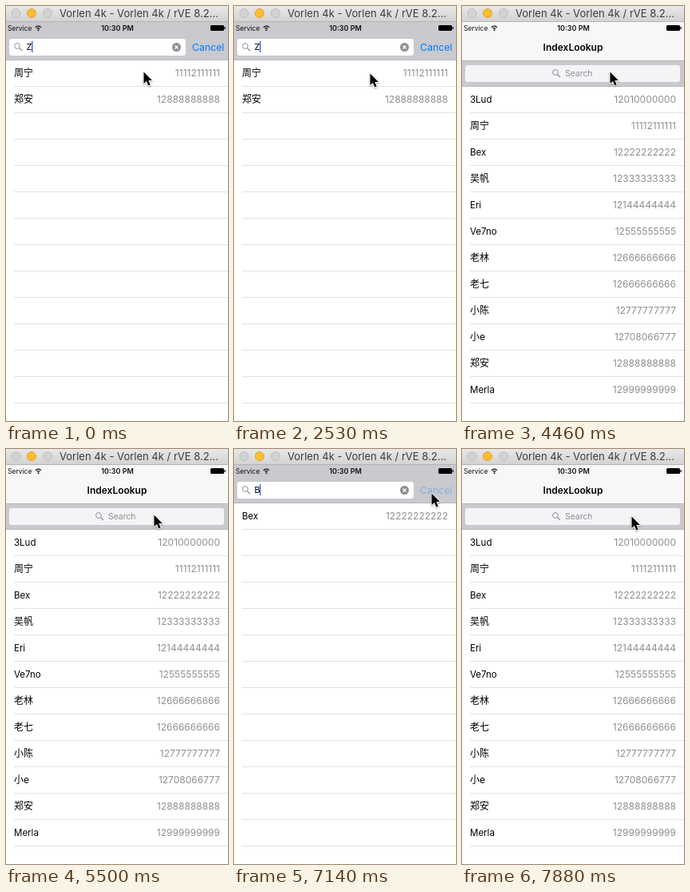
Animation, 278 px wide and 519 px high, one loop 8000 ms. Source, as an HTML page with a canvas:

```html
<!DOCTYPE html>
<html lang="zh">
<head>
<meta charset="utf-8">
<title>Contact search</title>
<style>
html, body { margin: 0; width: 100%; height: 100%; overflow: hidden; background: #fff; }
canvas { display: block; width: 278px; height: 519px; }
</style>
</head>
<body>
<canvas id="stage"></canvas>
<script>
const W = 278, H = 519, LOOP = 8000, TICK = 148.67;
const GRAY = '#8e8e93';
const FONT = 'Inter, "Noto Sans CJK SC", "Noto Sans CJK", sans-serif';

const contacts = [
  ['3Lud', '12010000000'], ['周宁', '11112111111'], ['Bex', '12222222222'],
  ['吴帆', '12333333333'], ['Eri', '12144444444'], ['Ve7no', '12555555555'],
  ['老林', '12666666666'], ['老七', '12666666666'], ['小陈', '12777777777'],
  ['小e', '12708066777'], ['郑安', '12888888888'], ['Merla', '12999999999']
];
const matches = { Z: [contacts[1], contacts[10]], B: [contacts[2]] };

// Pointer tip: time, x, y
const path = [
  [0, 172, 82], [300, 182, 84], [600, 204, 84], [1040, 187, 84], [1340, 174, 84],
  [1630, 170, 84], [2560, 170, 84], [3300, 251, 46], [3717, 251, 46], [4460, 185, 82],
  [6400, 185, 82], [7080, 247, 55], [7285, 247, 55], [7582, 224, 74], [7733, 216, 81], [7880, 212, 84]
];

const canvas = document.getElementById('stage');
const ctx = canvas.getContext('2d');
const dpr = window.devicePixelRatio || 1;
canvas.width = W * dpr;
canvas.height = H * dpr;

const ease = x => { x = Math.min(1, Math.max(0, x)); return x * x * (3 - 2 * x); };

function box(x, y, w, h, color) {
  ctx.fillStyle = color;
  ctx.fillRect(x, y, w, h);
}

function roundBox(x, y, w, h, r, color) {
  ctx.fillStyle = color;
  ctx.beginPath();
  ctx.roundRect(x, y, w, h, r);
  ctx.fill();
}

function disc(x, y, r, fill, edge) {
  ctx.beginPath();
  ctx.arc(x, y, r, 0, Math.PI * 2);
  ctx.fillStyle = fill;
  ctx.fill();
  if (edge) { ctx.strokeStyle = edge; ctx.lineWidth = 1; ctx.stroke(); }
}

function line(points, color, width) {
  ctx.beginPath();
  points.forEach(([x, y]) => ctx.lineTo(x, y));
  ctx.strokeStyle = color;
  ctx.lineWidth = width;
  ctx.stroke();
}

function label(str, x, y, size, color, align = 'left', weight = 400) {
  ctx.font = `${weight} ${size}px ${FONT}`;
  ctx.textAlign = align;
  ctx.fillStyle = color;
  ctx.fillText(str, x, y);
}

function faded(alpha, draw) {
  ctx.save();
  ctx.globalAlpha = alpha;
  draw();
  ctx.restore();
}

// 0 = searching, 1 = full list with navigation bar
function openness(t) {
  if (t < 5400) return ease((t - 3590) / 300);
  if (t < 7200) return 1 - ease((t - 5480) / 350);
  return ease((t - 7250) / 300);
}

function queryAt(t) {
  if (t < 3560) return 'Z';
  return t > 5790 && t < 7280 ? 'B' : '';
}

function caretAlpha(t) {
  const start = t < 5000 ? 2527 : 5947;
  const phase = ((t - start) % 980 + 980) % 980;
  return phase < 530 ? 1 : phase < 680 ? 0.5 : 0;
}

function pointerAt(t) {
  const i = path.findIndex(k => k[0] > t);
  if (i < 0) return path[path.length - 1].slice(1);
  const [t0, x0, y0] = path[i - 1], [t1, x1, y1] = path[i];
  const k = (t - t0) / (t1 - t0);
  return [Math.round(x0 + (x1 - x0) * k), Math.round(y0 + (y1 - y0) * k)];
}

function drawRows(list, top) {
  list.forEach(([name, phone], i) => {
    const y = top + 33 * i + 20;
    label(name, 10, y, /^[\x00-\x7f]+$/.test(name) ? 11.5 : 12, '#000');
    label(phone, 268, y, 12, GRAY, 'right');
  });
}

function drawTable(p, top, query) {
  for (let y = top + 32; y < H; y += 33) box(10, y, W - 10, 1, '#e2e2e4');
  if (query) drawRows(matches[query], top);
  else if (p > 0) faded(p, () => drawRows(contacts, top));
}

function drawSearch(t, p, top, query) {
  box(0, 20, W, top - 20, '#c9c9ce');
  box(0, top - 1, W, 1, '#b9b9be');
  const y = top - 27, mid = y + 10;
  const right = Math.round(225 + 48 * p);
  roundBox(4, y, right - 4, 21, 3, p > 0.9 ? '#f4f4f6' : '#fff');

  const ix = Math.round(10 + 103 * Math.pow(p, 0.67));
  ctx.beginPath();
  ctx.arc(ix + 4, mid - 1, 3.4, 0, Math.PI * 2);
  ctx.strokeStyle = GRAY;
  ctx.lineWidth = 1;
  ctx.stroke();
  line([[ix + 6.5, mid + 1.5], [ix + 10, mid + 5]], GRAY, 1.2);

  if (query) {
    label(query, 25.5, mid + 4, 11, '#000');
    const cx = right - 11.5, cy = mid + 0.5;
    disc(cx, cy, 5.5, GRAY);
    line([[cx - 2, cy - 2], [cx + 2, cy + 2]], '#fff', 1.2);
    line([[cx + 2, cy - 2], [cx - 2, cy + 2]], '#fff', 1.2);
    faded(caretAlpha(t), () => box(32, mid - 7, 1.5, 14, '#426bf2'));
  } else {
    label('Search', ix + 16, mid + 4, 10.4, GRAY);
  }

  const pressed = (t > 3400 && t < 4100) || t > 7120;
  faded(pressed ? 0.3 : 1 - p, () =>
    label('Cancel', Math.round(233 + 48 * p), mid + 4.5, 12.3, '#007aff'));
}

function drawNav(p) {
  const shift = Math.round(48 * (1 - p));
  if (shift < 48) {
    box(0, 20, W, 48 - shift, '#f7f7f8');
    box(0, 68 - shift, W, 1, '#b4b4b8');
  }
  label('IndexLookup', 139, 56 - shift, 12, '#000', 'center', 600);
}

function drawStatus() {
  label('Service', 2, 31, 8.5, '#111');
  ctx.strokeStyle = '#111';
  ctx.lineWidth = 1.2;
  [2.4, 4.8].forEach(r => {
    ctx.beginPath();
    ctx.arc(40.5, 30, r, -Math.PI * 0.77, -Math.PI * 0.23);
    ctx.stroke();
  });
  disc(40.5, 30.2, 1, '#111');
  label('10:30 PM', 139.5, 31, 9, '#111', 'center', 600);
  roundBox(256, 24, 17, 7, 1.5, '#000');
  box(273.5, 26, 1.2, 3, '#000');
}

function drawChrome() {
  const g = ctx.createLinearGradient(0, 0, 0, 19);
  g.addColorStop(0, '#e8e8e8');
  g.addColorStop(1, '#d3d3d3');
  box(0, 0, W, 19, g);
  box(0, 19, W, 1, '#b4b4b4');
  disc(12.5, 9, 5.5, '#d2d2d2', '#bdbdbd');
  disc(32, 9, 5.5, '#fdbe2f', '#e0a135');
  disc(52, 9, 5.5, '#d2d2d2', '#bdbdbd');
  label('Vorlen 4k - Vorlen 4k / rVE 8.2...', 67, 14, 13, '#3c3c3c');
}

function drawPointer(t) {
  const [x, y] = pointerAt(t);
  ctx.save();
  ctx.translate(x + 0.5, y + 0.5);
  const arrow = new Path2D('M0 0V14.5L3.4 11.4L5.8 17L8.2 16L5.8 10.5H10.4Z');
  ctx.lineJoin = 'round';
  ctx.lineWidth = 2;
  ctx.strokeStyle = '#fff';
  ctx.shadowColor = 'rgba(0,0,0,.35)';
  ctx.shadowBlur = 2 * dpr;
  ctx.shadowOffsetY = dpr;
  ctx.stroke(arrow);
  ctx.shadowColor = 'transparent';
  ctx.fillStyle = '#000';
  ctx.fill(arrow);
  ctx.restore();
}

function render(now) {
  const t = Math.floor((now % LOOP + 8) / TICK) * TICK;
  const p = openness(t), query = queryAt(t);
  const top = Math.round(68 + 33 * p);
  ctx.setTransform(dpr, 0, 0, dpr, 0, 0);
  box(0, 0, W, H, '#fff');
  drawTable(p, top, query);
  drawSearch(t, p, top, query);
  drawNav(p);
  drawStatus();
  drawChrome();
  drawPointer(t);
}

let begin;
function loop(now) {
  if (begin === undefined) begin = now;
  render(Math.max(0, now - begin));
  requestAnimationFrame(loop);
}
render(0);
requestAnimationFrame(loop);
</script>
</body>
</html>
```
